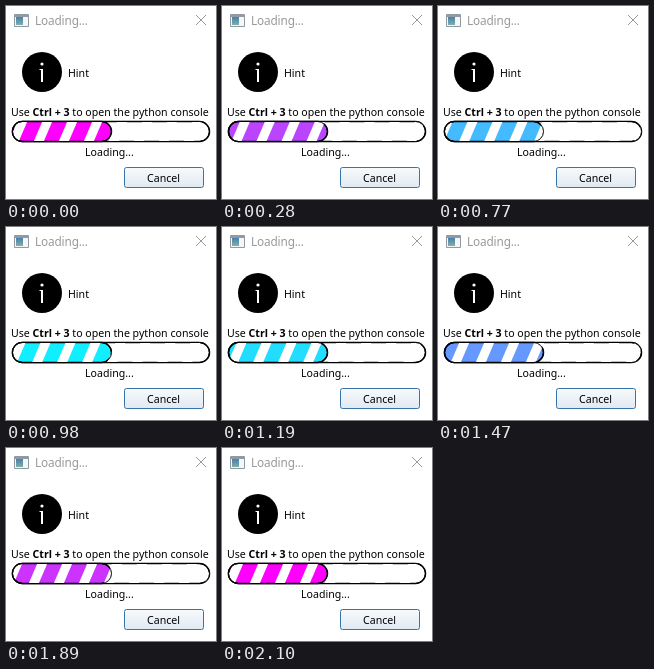
An HTML page with a canvas for the animation above (2170 ms loop, 210 by 193 pixels).

```html
<!DOCTYPE html>
<html lang="en">
<head>
<meta charset="utf-8">
<title>Loading...</title>
<style>
html, body { margin: 0; width: 100%; height: 100%; overflow: hidden; background: #fff; }
canvas, svg { position: absolute; left: 0; top: 0; display: block; }
text { font: 10.6px "Noto Sans", "Open Sans", sans-serif; fill: #000; white-space: pre; }
.title { font-size: 11.8px; letter-spacing: -0.15px; fill: #999; }
.bold { font-weight: 700; }
</style>
</head>
<body>
<canvas id="stage" width="210" height="193"></canvas>
<svg width="210" height="193">
  <text class="title" x="29" y="19">Loading...</text>
  <text x="62" y="71">Hint</text>
  <text x="5" y="110">Use <tspan class="bold">Ctrl + 3</tspan> to open the python console</text>
  <text x="79" y="150">Loading...</text>
  <text x="141" y="176">Cancel</text>
</svg>
<script>
const ctx = document.getElementById('stage').getContext('2d');
const STEP = 70, STEPS = 31, CYCLE = 30;
const BAR = { x: 6, y: 115, w: 198, h: 21, r: 10 };
const CHUNK = 100;
const PERIOD = 25, SLANT = 9, GAP = 10, START = 2.5;

function box(x, y, w, h, fill, stroke, r = 0) {
  ctx.beginPath();
  ctx.roundRect(x + 0.5, y + 0.5, w - 1, h - 1, r);
  ctx.fillStyle = fill;
  ctx.fill();
  if (stroke) {
    ctx.strokeStyle = stroke;
    ctx.lineWidth = 1;
    ctx.stroke();
  }
}

function fade(y1, y2, from, to) {
  const g = ctx.createLinearGradient(0, y1, 0, y2);
  g.addColorStop(0, from);
  g.addColorStop(1, to);
  return g;
}

function pill(w) {
  ctx.beginPath();
  ctx.roundRect(BAR.x + 0.5, BAR.y + 0.5, w - 1, BAR.h - 1, BAR.r);
}

function outline(w, weight) {
  pill(w);
  ctx.strokeStyle = '#000';
  ctx.lineWidth = weight;
  ctx.stroke();
}

function line(x1, y1, x2, y2) {
  ctx.beginPath();
  ctx.moveTo(x1, y1);
  ctx.lineTo(x2, y2);
  ctx.stroke();
}

function drawWindow() {
  ctx.fillStyle = '#fff';
  ctx.fillRect(0, 0, 210, 193);

  box(8, 8, 15, 13, '#f4f6f7', '#8f9aa3');
  ctx.fillStyle = '#8f9aa3';
  ctx.fillRect(9, 9, 13, 2);
  ctx.fillStyle = fade(11, 19, '#4a7fb0', '#7fb0a8');
  ctx.fillRect(10, 11, 7, 8);

  ctx.strokeStyle = '#999';
  ctx.lineWidth = 1;
  line(190, 9, 200, 19);
  line(200, 9, 190, 19);

  ctx.fillStyle = '#000';
  ctx.beginPath();
  ctx.arc(36, 66, 20, 0, Math.PI * 2);
  ctx.fill();
  ctx.fillStyle = '#fff';
  ctx.beginPath();
  ctx.arc(36, 58, 1.6, 0, Math.PI * 2);
  ctx.fill();
  ctx.fillRect(35, 63, 2, 13);
  ctx.fillRect(33.5, 63, 2, 1);

  box(118, 161, 80, 21, fade(161, 182, '#f8fbfd', '#e0e8f1'), '#3674a9', 2);
}

function drawBar(n) {
  const phase = n % CYCLE / CYCLE;
  const red = Math.round(255 * Math.abs(1 - 2 * phase));
  const shift = 2 * PERIOD * phase;

  outline(BAR.w, 1.5);
  pill(CHUNK);
  ctx.fillStyle = `rgb(${red},${255 - red},255)`;
  ctx.fill();
  outline(CHUNK, 1.5);

  ctx.save();
  pill(BAR.w);
  ctx.clip();
  ctx.fillStyle = '#fff';
  for (let x = START - 3 * PERIOD + shift; x < 215; x += PERIOD) {
    ctx.beginPath();
    ctx.moveTo(x, 136);
    ctx.lineTo(x + SLANT, 115);
    ctx.lineTo(x + SLANT + GAP, 115);
    ctx.lineTo(x + GAP, 136);
    ctx.fill();
  }
  ctx.restore();
  outline(BAR.w, 1);
  outline(CHUNK, 1);
}

function frame(now) {
  drawWindow();
  drawBar(Math.floor(now / STEP) % STEPS);
  requestAnimationFrame(frame);
}
frame(0);
</script>
</body>
</html>
```
